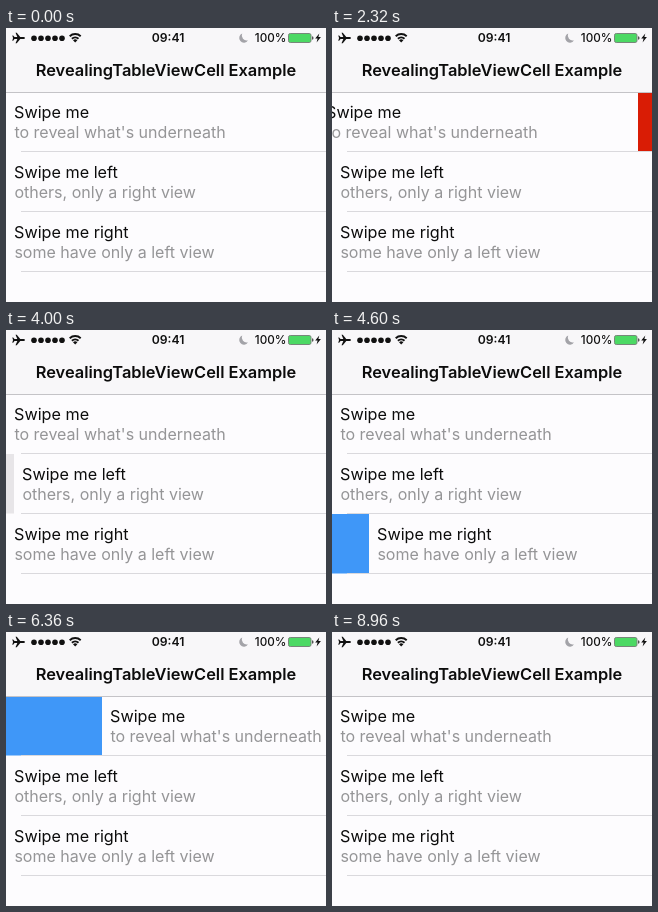
An HTML page that plays this animation: 320x274 px, repeating every 9.04 s.

```html
<!DOCTYPE html>
<html lang="en">
<head>
<meta charset="utf-8">
<title>Swipeable table cells</title>
<style>
  html, body { margin: 0; width: 100%; height: 100%; overflow: hidden; background: #fdfcfe; }
  svg { display: block; width: 320px; height: 274px; font-family: Inter, Roboto, sans-serif; }
  .title { font-size: 16.2px; fill: #0c0c0c; }
  .detail { font-size: 16.05px; fill: #959597; }
  .line { stroke: #dad9dd; }
</style>
</head>
<body>
<svg viewBox="0 0 320 274">
  <rect width="320" height="274" fill="#fdfcfe"/>
  <g id="rows"></g>

  <rect width="320" height="64" fill="#f8f7f9"/>
  <path d="M0 64.5H320" stroke="#c4c3c7"/>
  <text x="160" y="48" text-anchor="middle" font-size="16.42" font-weight="600" fill="#0c0c0c">RevealingTableViewCell Example</text>

  <g fill="#111">
    <path transform="translate(1.7 .8) scale(.91)" d="M19 10.2q0-1.2-1.6-1.2H13.8L10 4.3H8.6L10.6 9H7.5L6 7.3H5l.9 2.9L5 13H6l1.5-1.7h3.1L8.6 16H10l3.8-4.7h3.6q1.6 0 1.6-1.1z"/>
    <g id="signal"></g>
    <path d="M63.7 8.2a8 8 0 0 1 11 0M65.9 10.8a4.8 4.8 0 0 1 6.6 0" fill="none" stroke="#111" stroke-width="1.9"/>
    <path d="M67 12.2a3.2 3.2 0 0 1 4.4 0L69.2 14.6z"/>
    <text x="162" y="14.4" text-anchor="middle" font-size="12.2" font-weight="600">09:41</text>
    <text x="248.8" y="14.4" font-size="11.7" font-weight="500">100%</text>
    <path d="M236.2 5.6a4.7 4.7 0 1 0 5.8 6.7a4.9 4.9 0 0 1-5.8-6.7z" fill="#a3a3a8"/>
    <rect x="282.5" y="5.5" width="22.5" height="9" rx="1.8" fill="#4cd964" stroke="#77877a"/>
    <path d="M306 8.2q1.6.3 1.6 1.8t-1.6 1.8z" fill="#555"/>
    <path d="M313.3 5.5L309.2 10.6h2.4L310.6 14.4l4.3-5.4h-2.5z"/>
  </g>
</svg>
<script>
const LOOP = 9040, STEP = 40, ROW_HEIGHT = 60, TOP = 64;
const BLUE = '#3f97f8', RED = '#d91c05', GRAY = '#e7e5e8';

// Each swipe is a list of [time in ms, horizontal offset in px].
const cells = [
  { title: 'Swipe me', detail: "to reveal what's underneath", left: BLUE, right: RED,
    swipe: [[200, 0], [700, 96], [1340, 0], [2180, 0], [2760, -96], [3400, 0],
            [5560, 0], [6000, 96], [6800, 96], [7185, 0]] },
  { title: 'Swipe me left', detail: 'others, only a right view', left: GRAY, right: RED,
    swipe: [[3440, 0], [3680, -80], [3900, 0], [4100, 16], [4400, 0],
            [6960, 0], [7160, 15], [7320, 18], [7500, 0], [7820, -80], [8280, 0]] },
  { title: 'Swipe me right', detail: 'some have only a left view', left: BLUE, right: GRAY,
    swipe: [[4440, 0], [4820, 96], [5270, 0]] }
];

const smooth = u => u * u * (3 - 2 * u);

function offsetAt(swipe, time) {
  const next = swipe.findIndex(([t]) => t > time);
  if (next < 1) return 0;
  const [t0, x0] = swipe[next - 1], [t1, x1] = swipe[next];
  return Math.round(x0 + (x1 - x0) * smooth((time - t0) / (t1 - t0)));
}

document.getElementById('rows').innerHTML = cells.map((cell, i) => `
  <g transform="translate(0 ${TOP + i * ROW_HEIGHT})">
    <rect width="160" height="59.5" fill="${cell.left}"/>
    <rect x="160" width="160" height="59.5" fill="${cell.right}"/>
    <g class="cover">
      <rect width="320" height="60" fill="#fdfcfe"/>
      <text class="title" x="8" y="25.6">${cell.title}</text>
      <text class="detail" x="8.4" y="46">${cell.detail}</text>
    </g>
    <path class="line" d="M15 59.5H320"/>
  </g>`).join('');

document.getElementById('signal').innerHTML = [0, 1, 2, 3, 4]
  .map(i => `<circle cx="${28 + i * 7}" cy="10.2" r="2.8"/>`).join('');

const covers = document.querySelectorAll('.cover');
const start = performance.now();

function draw() {
  const elapsed = (performance.now() - start) % LOOP;
  const time = Math.floor(elapsed / STEP) * STEP;
  cells.forEach((cell, i) =>
    covers[i].setAttribute('transform', `translate(${offsetAt(cell.swipe, time)} 0)`));
  requestAnimationFrame(draw);
}
draw();
</script>
</body>
</html>
```
